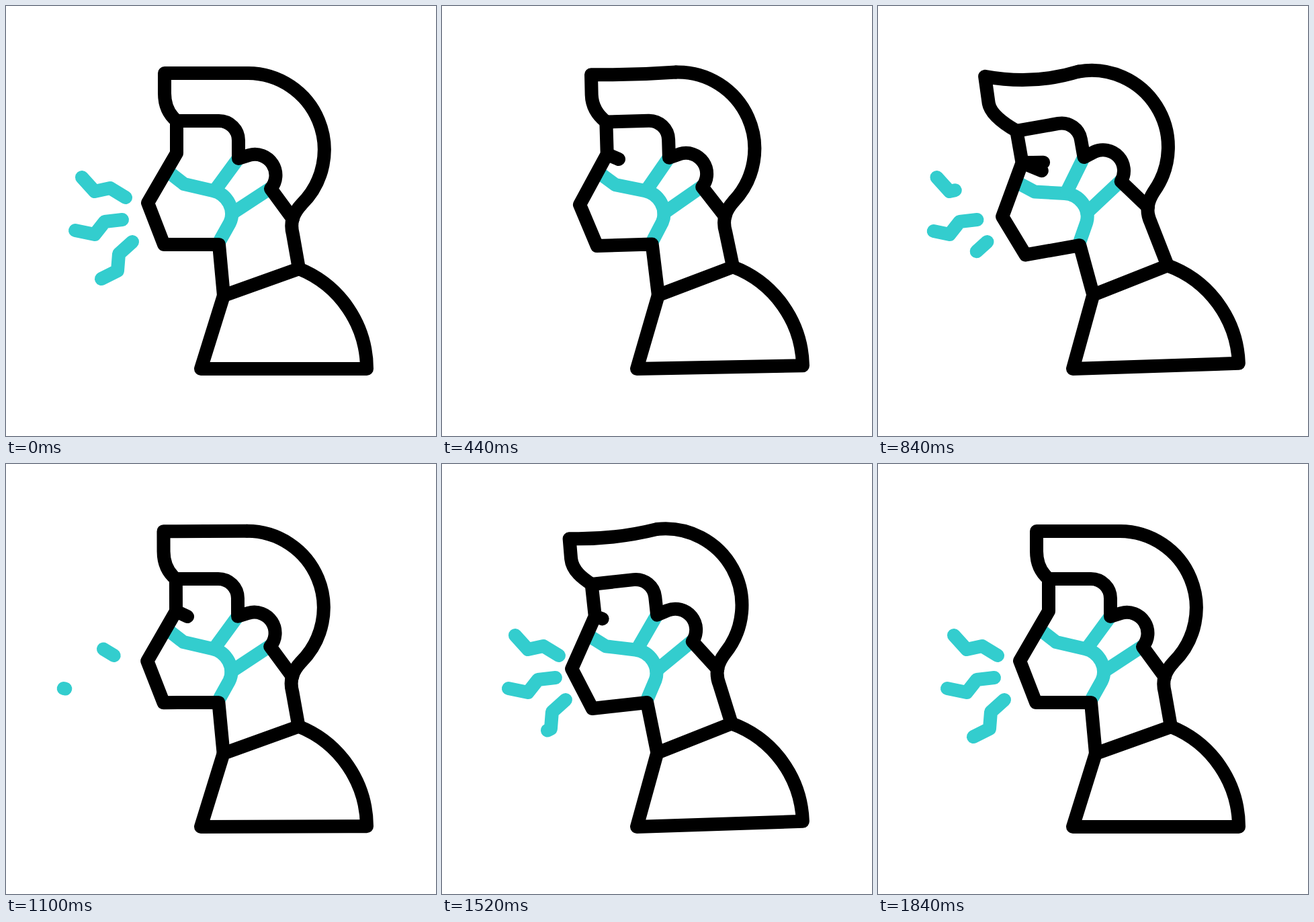
Recreate the animation shown at these times as an HTML page. Size 640 by 640 pixels, loop 3.02 s.

```html
<!DOCTYPE html>
<html lang="en">
<head>
<meta charset="utf-8">
<title>Coughing man</title>
<style>
  html, body { margin: 0; height: 100%; overflow: hidden; background: #fff; }
  svg { display: block; width: 100%; height: 100%; }
  path { fill: none; stroke: #000; stroke-width: 20; stroke-linecap: round; stroke-linejoin: round; }
  .teal path { stroke: #33cdce; }
</style>
</head>
<body>
<svg viewBox="0 0 640 640">
  <g id="waves" class="teal">
    <path pathLength="1" d="M113 255 L132 276 L155 271 L178 285"/>
    <path pathLength="1" d="M173 318 L147 321 L132 340 L103 334"/>
    <path pathLength="1" d="M188 351 L168 369 L166 394 L142 406"/>
  </g>
  <g id="body">
    <g id="head">
      <g class="teal">
        <path d="M242 247 L265 265 L308 275 C330 280 342 304 333 323 L319 348"/>
        <path d="M312 273 L345 228"/>
        <path d="M336 309 L394 271"/>
      </g>
      <path d="M254 171 V219 L211 293 L235 355 H317 L324 431"/>
      <path d="M254 171 H317 A29 29 0 0 1 346 200 V227 L362 222 A31 31 0 0 1 394 272 L427 317"/>
      <path id="eye"/>
      <path id="fringe"/>
      <path id="back"/>
    </g>
    <path d="M324 431 L436 391 A161 161 0 0 1 537 540 H290 Z"/>
  </g>
</svg>
<script>
const LOOP = 3020, STEP = 20;
const $ = id => document.getElementById(id);
const waves = [...$('waves').children];

// The waves of the last cough stay until the first one wipes them away.
const coughs = [
  { start: 160, speed: 1.15, growAt: -LOOP, eraseAt: 80, eyeShutAt: 390 },
  { start: 720, speed: 1, growAt: 50, eraseAt: 310, eyeShutAt: 390 },
  { start: 1280, speed: 1, growAt: 50, eraseAt: Infinity, eyeShutAt: 210 }
];
const growTimes = [150, 75, 260];

const mix = (a, b, k) => a + (b - a) * k;
const ramp = (t, from, to) => Math.min(1, Math.max(0, (t - from) / (to - from)));
const ease = (t, from, to) => { const k = ramp(t, from, to); return k * k * (3 - 2 * k); };
const bump = (t, rise, top, fall, end) => ease(t, rise, top) - ease(t, fall, end);

function eyePath(stem, open) {
  const x = mix(254, 271, stem), y = mix(219, 227, stem);
  return stem ? `M${x + 13 * open} ${y + 12 * open} L254 219 L${x + 19 * open} ${y - 4 * open}` : '';
}

function fringePath(sweep, lift, sag) {
  const x = 236 - sweep, y = 100 - lift, kneeX = 236 - sweep * 1.1, kneeY = 130 - lift * .4;
  return `M254 171 C242 161 ${kneeX} ${kneeY + 18} ${kneeX} ${kneeY} L${x} ${y}
    C${mix(x, 360, 1 / 3)} ${mix(y, 100, 1 / 3) + sag}
    ${mix(x, 360, 2 / 3)} ${mix(y, 100, 2 / 3) + sag} 360 100`;
}

// The neck leaves with the head but stays fixed to the shoulder.
function backPath(angle) {
  const a = angle * Math.PI / 180, c = Math.cos(a), s = Math.sin(a);
  const dx = 436 - 323, dy = 391 - 431;
  return `M360 100 A114 114 0 0 1 440 295 C428 308 422 321 427 340
    L${323 + dx * c - dy * s} ${431 + dx * s + dy * c}`;
}

function drawWaves(t, p, cough) {
  const drift = ramp(t, 460, 720) - ramp(t, 840, 1650);
  $('waves').setAttribute('transform', `translate(${-25.5 * drift} 0)`);
  waves.forEach((wave, i) => {
    const eraseAt = cough.eraseAt + (2 - i) * 12;
    const start = p < eraseAt ? 0 : ramp(p, eraseAt, eraseAt + 60);
    const length = ramp(p, cough.growAt, cough.growAt + growTimes[i]) - start;
    wave.style.display = length > .005 ? '' : 'none';
    wave.style.strokeDasharray = length > .995 ? 'none' : `${length} 2`;
    wave.style.strokeDashoffset = -start;
  });
}

function draw(t) {
  const cough = coughs.findLast(c => c.start <= t) || coughs[2];
  const p = t < coughs[0].start ? LOOP : (t - cough.start) * cough.speed;
  const lean = 8.1 * bump(p, 0, 110, 130, 360);
  const sweep = bump(p, 0, 80, 80, 400);
  const lift = bump(p, 60, 120, 120, 220);
  const stem = bump(p, 0, 60, cough.eyeShutAt, cough.eyeShutAt + 70);
  $('body').setAttribute('transform', `rotate(${-1.9 * bump(p, 80, 120, 250, 410)} 290 540)`);
  $('head').setAttribute('transform', `rotate(${-lean} 323 431)`);
  $('eye').setAttribute('d', eyePath(stem, bump(p, 30, 85, 90, 180)));
  $('fringe').setAttribute('d', fringePath(15 * sweep, 17 * lift, 12 * sweep));
  $('back').setAttribute('d', backPath(lean));
  drawWaves(t, p, cough);
}

const begin = performance.now();
function frame() {
  const t = (performance.now() - begin) % LOOP;
  draw(Math.floor(t / STEP) * STEP);
  requestAnimationFrame(frame);
}
frame();
</script>
</body>
</html>
```
